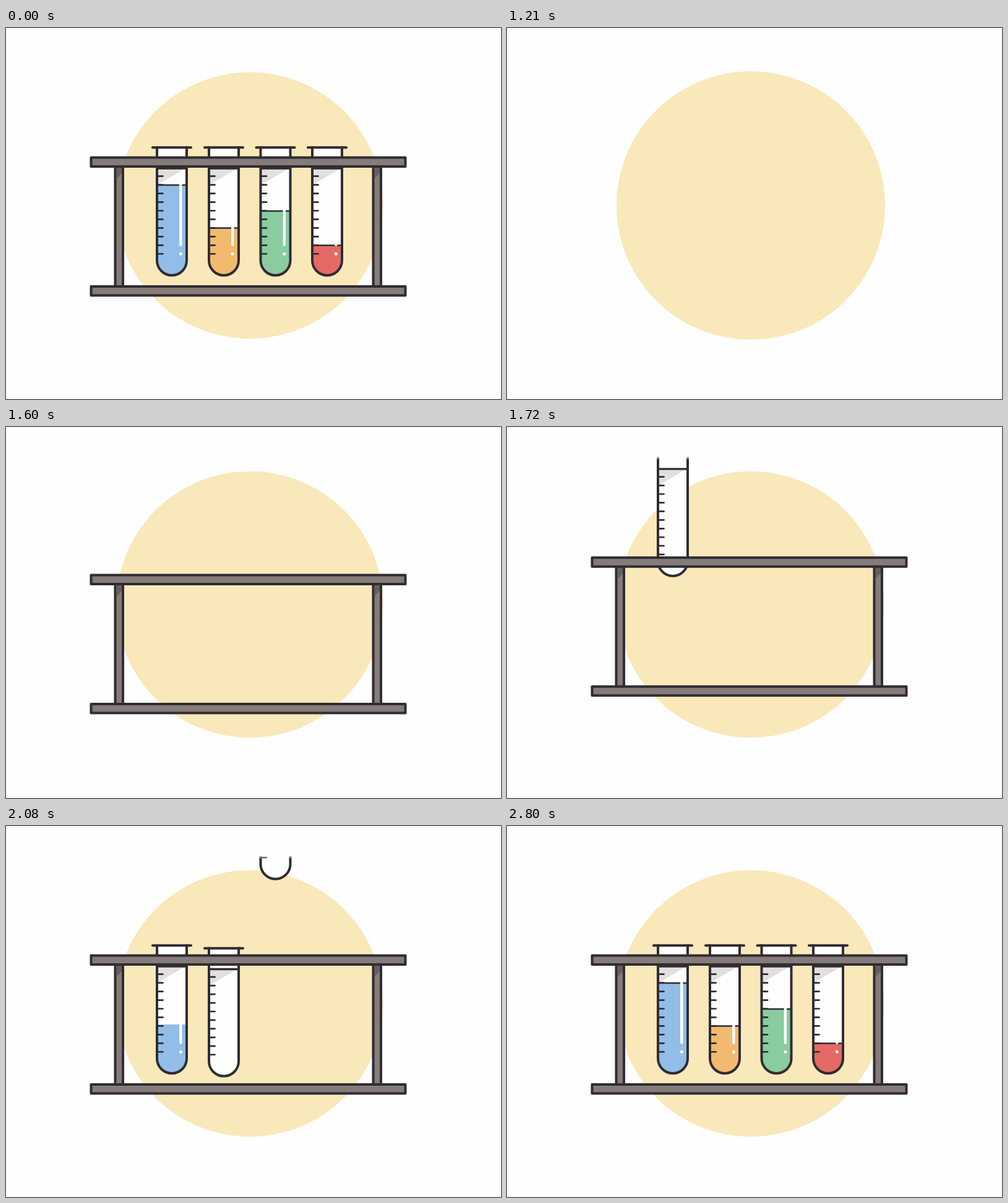
An HTML page with a canvas for the animation above (2.86 s loop, 800 px wide and 600 px high).

```html
<!DOCTYPE html>
<html lang="en">
<head>
<meta charset="utf-8">
<title>Test tube rack</title>
<style>
  html, body { margin: 0; width: 100%; height: 100%; overflow: hidden; background: #fefefe; }
  canvas { display: block; }
</style>
</head>
<body>
<canvas id="stage" width="800" height="600"></canvas>
<script>
const ctx = document.getElementById('stage').getContext('2d');
const LOOP = 2860, STEP = 30, HOLD = 1000, START = 1120;
const PAPER = '#fefefe', INK = '#2f2c33', WOOD = '#857b78', SHADE = '#e3dfdd';
const TOP = 48; // things enter from behind this edge

const tubes = [
  { x: 268, color: '#91bde7', level: 254, pour: [1890, 2250] },
  { x: 352, color: '#f1ba6e', level: 323.5, pour: [2130, 2485] },
  { x: 435.5, color: '#89cc9f', level: 296, pour: [2298, 2628] },
  { x: 519, color: '#e46a66', level: 351.5, pour: [2560, 2800] }
];

const part = (t, a, b) => Math.min(1, Math.max(0, (t - a) / (b - a)));
const smooth = (t, a, b) => { const p = part(t, a, b); return p * p * (3 - 2 * p); };

function backOut(p, s) {
  const q = p - 1;
  return 1 + (s + 1) * q ** 3 + s * q * q;
}

// Fall from a height, pass the resting place, come back to it
function drop(t, from, over, start, hit, rest) {
  return t < hit
    ? from + (over - from) * smooth(t, start, hit)
    : over * (1 - smooth(t, hit, rest));
}

function line(x1, y1, x2, y2, width, color = INK, cap = 'round') {
  ctx.beginPath();
  ctx.moveTo(x1, y1);
  ctx.lineTo(x2, y2);
  ctx.lineWidth = width;
  ctx.lineCap = cap;
  ctx.strokeStyle = color;
  ctx.stroke();
}

function disc(x, y, r, color) {
  ctx.beginPath();
  ctx.arc(x, y, r, 0, Math.PI * 2);
  ctx.fillStyle = color;
  ctx.fill();
}

function poly(color, ...pts) {
  ctx.beginPath();
  pts.forEach(([x, y]) => ctx.lineTo(x, y));
  ctx.fillStyle = color;
  ctx.fill();
}

function box(x, y, w, h) {
  ctx.fillStyle = WOOD;
  ctx.fillRect(x, y, w, h);
  ctx.lineWidth = 4;
  ctx.lineJoin = 'round';
  ctx.strokeStyle = INK;
  ctx.strokeRect(x, y, w, h);
}

function glass() {
  ctx.beginPath();
  ctx.moveTo(-24, 193);
  ctx.lineTo(-24, 376);
  ctx.arc(0, 376, 24, Math.PI, 0, true);
  ctx.lineTo(24, 193);
}

function drawTube(tube, i, t) {
  const start = 1620 + 210 * i;
  if (t < start) return;
  const y = drop(t, -356, 9, start, start + 190, start + 310);
  const [a, b] = tube.pour;
  const surface = 400 + (tube.level - 400) * smooth(t, a, b);

  ctx.save();
  ctx.translate(tube.x, y);
  glass();
  ctx.fillStyle = PAPER;
  ctx.fill();

  ctx.save();
  glass();
  ctx.clip();
  poly(SHADE, [-24, 227], [22, 227], [-24, 254]);
  if (t > a) {
    ctx.fillStyle = tube.color;
    ctx.fillRect(-26, surface, 52, 405 - surface);
    if (t >= b) line(-24, surface, 24, surface, 2.6, INK, 'butt');
    line(14.3, 252, 14.3, 350.5, 4.4, PAPER);
    disc(14.3, 365.3, 2.5, PAPER);
  }
  ctx.restore();

  for (let k = 0; k < 10; k++) {
    const ty = 239.7 + 13.95 * k;
    line(-22, ty, -14.5, ty, 2.7);
  }
  glass();
  ctx.lineWidth = 4;
  ctx.lineJoin = 'round';
  ctx.strokeStyle = INK;
  ctx.stroke();
  line(-24, 227, 24, 227, 3.4);
  line(-31, 193.3, 31, 193.3, 4);
  ctx.restore();
}

function drawRack(t) {
  const y = drop(t, -388, 30, 1383, 1600, 1740);
  const squash = 0.062 * (t < 1840 ? smooth(t, 1750, 1840) : 1 - smooth(t, 1840, 1990));
  ctx.save();
  ctx.translate(0, 434 + y);
  ctx.scale(1, 1 - squash);
  ctx.translate(0, -434);
  for (const x of [176.5, 593.5]) {
    box(x, 224, 12.5, 194);
    poly('#665e5d', [x + 2, 226], [x + 10.5, 226], [x + 10.5, 235], [x + 2, 244]);
  }
  box(137.5, 209.5, 508, 14.5);
  box(137.5, 418, 508, 14.5);
  ctx.restore();
}

function draw(t) {
  ctx.fillStyle = PAPER;
  ctx.fillRect(0, 0, 800, 600);
  if (t >= HOLD && t < START) return;
  // The finished picture is held first, then built again in even steps
  const now = t < HOLD ? LOOP : START + Math.floor((t - START) / STEP) * STEP;

  ctx.save();
  ctx.beginPath();
  ctx.rect(0, TOP, 800, 600 - TOP);
  ctx.clip();
  disc(394, 287, 215.5 * backOut(part(now, 1090, 1360), 1.3), '#f9e8b9');
  tubes.forEach((tube, i) => drawTube(tube, i, now));
  drawRack(now);

  const fade = ctx.createLinearGradient(0, TOP - 1, 0, TOP + 5);
  fade.addColorStop(0, 'rgba(254,254,254,1)');
  fade.addColorStop(1, 'rgba(254,254,254,0)');
  ctx.fillStyle = fade;
  ctx.fillRect(0, TOP, 800, 5);
  ctx.restore();
}

let begin = null;
function tick(time) {
  if (begin === null) begin = time;
  draw(Math.max(0, time - begin) % LOOP);
  requestAnimationFrame(tick);
}
draw(0);
requestAnimationFrame(tick);
</script>
</body>
</html>
```
